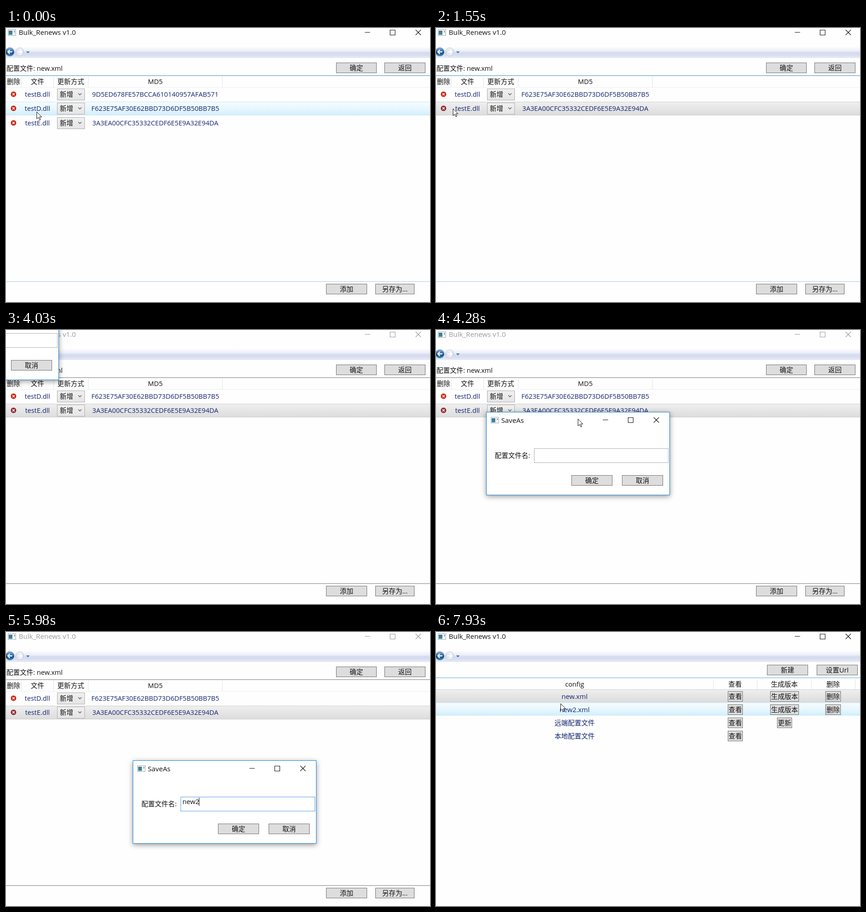
These frames come from a looping animation (930x602 px, 8000 ms). An HTML page:

```html
<!DOCTYPE html>
<html lang="zh-CN">
<head>
<meta charset="utf-8">
<title>Bulk_Renews</title>
<style>
  html, body { margin: 0; width: 100%; height: 100%; overflow: hidden; background: #fff; }
  svg { display: block; width: 100%; height: 100%; }
  text { font: 14.7px "Open Sans", "Noto Sans CJK SC", "Noto Sans CJK", sans-serif; fill: #111; white-space: pre; }
  .title { font-size: 15.2px; }
  .cell { fill: #14256f; }
  .mid { text-anchor: middle; }
  .btn rect { fill: #ddd; stroke: #707070; }
  .btn.hover rect { fill: #c4e5f6; stroke: #3c7fb1; }
  .btn.press rect { fill: #a9d8f0; stroke: #2c628b; }
  .ctl { fill: none; stroke: #111; stroke-width: 1.1; }
  .inactive text, .inactive .ctl { fill: #999; stroke: none; }
  .inactive .ctl { fill: none; stroke: #999; }
  .sep { stroke: #dfe3e8; }
  .shadow { filter: drop-shadow(0 3px 6px rgba(0, 0, 0, .4)); }
</style>
</head>
<body>
<svg id="stage" viewBox="0 0 930 602" preserveAspectRatio="none"></svg>
<script>
const stage = document.getElementById('stage');

// ---- markup helpers ----
const text = (x, y, s, cls = '') => `<text x="${x}" y="${y}" class="${cls}">${s}</text>`;
const button = (x, y, w, h, label, id = '') =>
  `<g class="btn" id="${id}"><rect x="${x + .5}" y="${y + .5}" width="${w}" height="${h}"/>` +
  text(x + w / 2 + .5, y + h / 2 + 5.7, label, 'mid') + '</g>';
const seps = (xs, y1, y2) => xs.map(x => `<path class="sep" d="M${x + .5} ${y1}V${y2}"/>`).join('');
const line = (id, y, color) => `<rect id="${id}" y="${y}" width="930" height="1.2" fill="${color}"/>`;
const band = (id, y, h) => `<rect id="${id}" x="-1" y="${y + .5}" width="932" height="${h}"/>`;
const gradient = (id, ...stops) => `<linearGradient id="${id}" x2="0" y2="1">` +
  stops.map(([o, c]) => `<stop offset="${o}" stop-color="${c}"/>`).join('') + '</linearGradient>';
const appIcon = (x, y) => `<g transform="translate(${x} ${y})">
  <rect x=".5" y=".5" width="17" height="13" fill="#f3f5f6" stroke="#a9adb2"/>
  <rect x="2" y="3" width="8" height="9" fill="url(#icon)"/>
  <path d="M14.5 3v4" stroke="#4b7fb5" stroke-width="1.5"/></g>`;
const windowControls = (x, y) =>
  `<path class="ctl" d="M${x} ${y + 5.5}h11.5M${x + 55.5} ${y + .5}h11v11h-11zM${x + 111.5} ${y}l11.5 11.5m0-11.5l-11.5 11.5"/>`;

// ---- file page ----
const files = [
  ['testB.dll', '9D5ED678FE57BCCA610140957AFAB571'],
  ['testD.dll', 'F623E75AF30E62BBD73D6DF5B50BB7B5'],
  ['testE.dll', '3A3EA00CFC35332CEDF6E5E9A32E94DA'],
];
const fileTop = i => Math.round(i * 31.4);
const fileRow = ([name, hash], i) => `<g id="file${i}">
  <circle id="del${i}" cx="16.5" cy="145.5" r="6" fill="#c8260f"/>
  <path d="M14 143l5 5m0-5l-5 5" stroke="#fff" stroke-width="1.7"/>
  ${text(69, 151, name, 'cell mid')}
  <rect x="112.5" y="133.5" width="60" height="25" fill="url(#combo)" stroke="#acacac"/>
  ${text(118, 151, '新增')}
  <path d="M158.5 143.5l3.5 3.5 3.5-3.5" fill="none" stroke="#555" stroke-width="1.3"/>
  ${text(327.5, 151, hash, 'cell mid')}</g>`;

const filePage = `<g id="filePage">
  ${text(1, 94, '配置文件: new.xml')}
  ${button(724, 76, 88, 22, '确定')}${button(830, 76, 89, 22, '返回')}
  ${line('topLine', 104, '#5b9cc8')}
  ${seps([33, 104, 180, 474], 107, 130)}<path d="M0 130.5h930" stroke="#eceff3"/>
  ${text(16.5, 123, '删除', 'mid')}${text(69, 123, '文件', 'mid')}
  ${text(142, 123, '更新方式', 'mid')}${text(327.5, 123, 'MD5', 'mid')}
  ${[0, 1, 2].map(i => band('fileBand' + i, 131 + fileTop(i), 29)).join('')}
  <rect id="delFocus" x="9" y="138" width="15.5" height="15.5" fill="#b9e2f5" stroke="#2c628b" stroke-width="1.3"/>
  ${files.map(fileRow).join('')}
  ${line('bottomLine', 556.5, '#b3d2e3')}
  ${button(702, 562, 89, 22, '添加')}${button(810, 562, 85, 22, '另存为...', 'saveAs')}</g>`;

// ---- configuration page ----
const configs = [
  ['new.xml', '生成版本', true], ['new2.xml', '生成版本', true],
  ['远端配置文件', '更新', false], ['本地配置文件', '', false],
];
const configRow = ([name, action, removable], i) => {
  const y = 130 + i * 29;
  const wide = action.length > 2;
  return text(304, y + 16.5, name, 'cell mid') + button(640, y, 32, 22, '查看') +
    (action && button(wide ? 733 : 748, y, wide ? 62 : 32, 22, action)) +
    (removable ? button(854, y, 33, 22, '删除') : '');
};
const configPage = `<g id="configPage">
  ${button(726, 72, 89, 22, '新建')}${button(835, 72, 89, 22, '设置Url')}
  ${line('', 100, '#7fb4d8')}
  ${seps([608, 704, 823, 919], 104, 127)}<path d="M0 126.5h930" stroke="#e3e6ea"/>
  ${text(304, 119.5, 'config', 'mid')}${text(656, 119.5, '查看', 'mid')}
  ${text(764, 119.5, '生成版本', 'mid')}${text(871, 119.5, '删除', 'mid')}
  ${configs.map((_, i) => band('configBand' + i, 126 + i * 29, 27.5)).join('')}
  ${configs.map(configRow).join('')}</g>`;

// ---- window frame, dialog, pointers ----
const navBar = `<rect y="40" width="930" height="26" fill="url(#nav)"/>
  <circle cx="8.5" cy="52.5" r="9.5" fill="url(#back)" stroke="#7f9fbe"/>
  <path d="M14 52.5H4m4.5-4.5L4 52.5l4.5 4.5" fill="none" stroke="#fff" stroke-width="2.4"/>
  <circle cx="30" cy="52.5" r="9" fill="url(#forward)" stroke="#bfc7d6"/>
  <path d="M25 52.5h10m-4.5-4.5l4.5 4.5-4.5 4.5" fill="none" stroke="#fff" stroke-width="2.4"/>
  <path d="M44 51.5h8l-4 4z" fill="#2b7bb4"/>`;

const dialog = `<g id="dialog">
  <rect class="shadow" x=".5" y=".5" width="402" height="182" fill="#fff" stroke="#1883d7"/>
  ${appIcon(10, 11)}${text(33, 24, 'SaveAs', 'title')}${windowControls(256, 12)}
  ${text(19, 101, '配置文件名:')}
  <rect id="field" x="105.5" y="80.5" width="294" height="31" fill="#fff" stroke="#abadb3"/>
  ${text(109, 96, '', '').replace('<text', '<text id="typed"')}
  <path id="caret" d="M0 82v18" stroke="#000"/>
  ${button(187, 139, 89, 22, '确定', 'confirm')}${button(298, 139, 89, 22, '取消')}</g>`;

stage.innerHTML = `<defs>
  ${gradient('nav', [0, '#fff'], [.4, '#eceff8'], [.55, '#d5dbee'], [.75, '#d8deef'], [1, '#e9ecf7'])}
  ${gradient('back', [0, '#8db4d8'], [.45, '#2c66a4'], [.55, '#123f78'], [1, '#2f93cf'])}
  ${gradient('forward', [0, '#f5f7fa'], [.5, '#d9dee8'], [1, '#eef1f6'])}
  ${gradient('icon', [0, '#3c6f9c'], [1, '#3d9191'])}
  ${gradient('combo', [0, '#f0f0f0'], [1, '#e5e5e5'])}
  ${gradient('hover', [0, '#f5fcff'], [.5, '#e8f7fe'], [1, '#d2effc'])}
  ${gradient('strong', [0, '#eaf8ff'], [1, '#c9edfc'])}
  ${gradient('selected', [0, '#efefef'], [1, '#dcdcdc'])}
  </defs>
  <rect width="930" height="602" fill="#fefefe"/>
  <g id="titleBar">${appIcon(4, 3)}${text(28, 15, 'Bulk_Renews v1.0', 'title')}${windowControls(787, 4)}</g>
  ${navBar}${filePage}${configPage}${dialog}
  <path id="arrow" d="M.5 .5V15.7L4 12.4 6.6 18 8.9 17 6.4 11.4H11.2Z" fill="#fff" stroke="#111"/>
  <path id="beam" d="M-3-9h2.5l.5.7.5-.7H3M0-8.5v17M-3 9h2.5l.5-.7.5.7H3" fill="none" stroke="#111"/>`;

const $ = id => document.getElementById(id);
const show = (id, on) => { $(id).style.display = on ? '' : 'none'; };
const place = (id, x, y) => $(id).setAttribute('transform', `translate(${x} ${y})`);
const within = (t, a, b) => t >= a && t < b;

// ---- motion: [start, end, steps, x, y] ----
const moves = [
  [-10, 470, 6, 18, 153],
  [1090, 1250, 2, 18, 168],
  [1472, 2330, 11, 847, 568],
  [2500, 3100, 8, -85, -58],
  [4580, 4800, 3, 458, 380],
  [4800, 4890, 1, 458, 388],
  [6200, 6600, 5, 514, 457],
  [6600, 6760, 2, 512, 437],
  [7070, 7700, 8, 290, 108],
  [7700, 7930, 3, 273, 157],
];
const drag = [
  [4030, -287, -73], [4150, -120, 36], [4220, 110, 180], [4310, 290, 300],
  [4400, 358, 344], [4490, 291, 302], [4580, 278, 282],
];
const dialogAt = t => drag.filter(k => k[0] <= t).pop() || drag[0];

function pointerAt(t) {
  if (within(t, 4030, 4580)) {
    const [, x, y] = dialogAt(t);
    return [x + 201, y + 15];
  }
  let x = 67, y = 184;
  for (const [start, end, steps, tx, ty] of moves) {
    if (t < start) break;
    if (start === 4580) [x, y] = [479, 297];
    const k = Math.min(1, Math.floor((t - start) / (end - start) * steps + 1e-6) / steps);
    const e = k * k * (3 - 2 * k);
    x += (tx - x) * e;
    y += (ty - y) * e;
  }
  return [Math.round(x), Math.round(y)];
}

const borders = { hover: '#c9e6f5', strong: '#a9d9f0', selected: '#cfcfcf' };
function paintBand(id, look) {
  show(id, look);
  if (!look) return;
  $(id).setAttribute('fill', `url(#${look})`);
  $(id).setAttribute('stroke', borders[look]);
}

function drawFiles(t, y) {
  const removed = t >= 930;
  const hovered = t < 2410 ? Math.floor((y - 131) / 31.5) : -1;
  files.forEach((_, i) => {
    show('file' + i, !(removed && i === 0));
    place('file' + i, 0, fileTop(i - removed));
    const look = t >= 1400 && i === 1 ? 'selected' : i !== hovered || (removed && i === 2) ? '' :
      within(t, 850, 930) ? 'strong' : 'hover';
    paintBand('fileBand' + i, look);
  });
  $('del2').setAttribute('fill', t >= 1400 ? '#8f2933' : '#c8260f');
  show('delFocus', within(t, 700, 930));
  $('topLine').setAttribute('fill', t < 2410 ? '#5b9cc8' : '#858a94');
  $('bottomLine').setAttribute('fill', t < 2250 ? '#b3d2e3' : '#858a94');
  $('saveAs').setAttribute('class', within(t, 2330, 2500) ? 'btn hover' : 'btn');
}

function drawConfigs(y) {
  const hovered = Math.floor((y - 127) / 29);
  configs.forEach((_, i) => paintBand('configBand' + i, i === 0 ? 'selected' : i === hovered ? 'hover' : ''));
}

function drawDialog(t) {
  const [, x, y] = dialogAt(t);
  place('dialog', x, y);
  const count = [5500, 5590, 5670, 5980].filter(k => t >= k).length;
  $('typed').textContent = 'new2'.slice(0, count);
  place('caret', Math.round(109 + (count ? $('typed').getComputedTextLength() : 0)) - .5, 0);
  show('caret', within(t, 4960, 6510));
  $('field').setAttribute('stroke', t < 4890 ? '#abadb3' : '#569de5');
  $('confirm').setAttribute('class', t >= 6910 ? 'btn press' : t >= 6760 ? 'btn hover' : 'btn');
}

function draw(t) {
  const [x, y] = pointerAt(t);
  const listing = t >= 6990;
  const beam = within(t, 4800, 5500) || within(t, 6280, 6360);
  show('filePage', !listing);
  show('configPage', listing);
  show('dialog', within(t, 4030, 6990));
  $('titleBar').setAttribute('class', within(t, 2500, 6990) ? 'inactive' : '');
  listing ? drawConfigs(y) : drawFiles(t, y);
  if (within(t, 4030, 6990)) drawDialog(t);
  place('arrow', x, y);
  place('beam', x + .5, y);
  show('beam', beam);
  show('arrow', !beam && !within(t, 5500, 6280));
}

const began = performance.now();
function tick() {
  draw((performance.now() - began) % 8000);
  requestAnimationFrame(tick);
}
tick();
</script>
</body>
</html>
```
